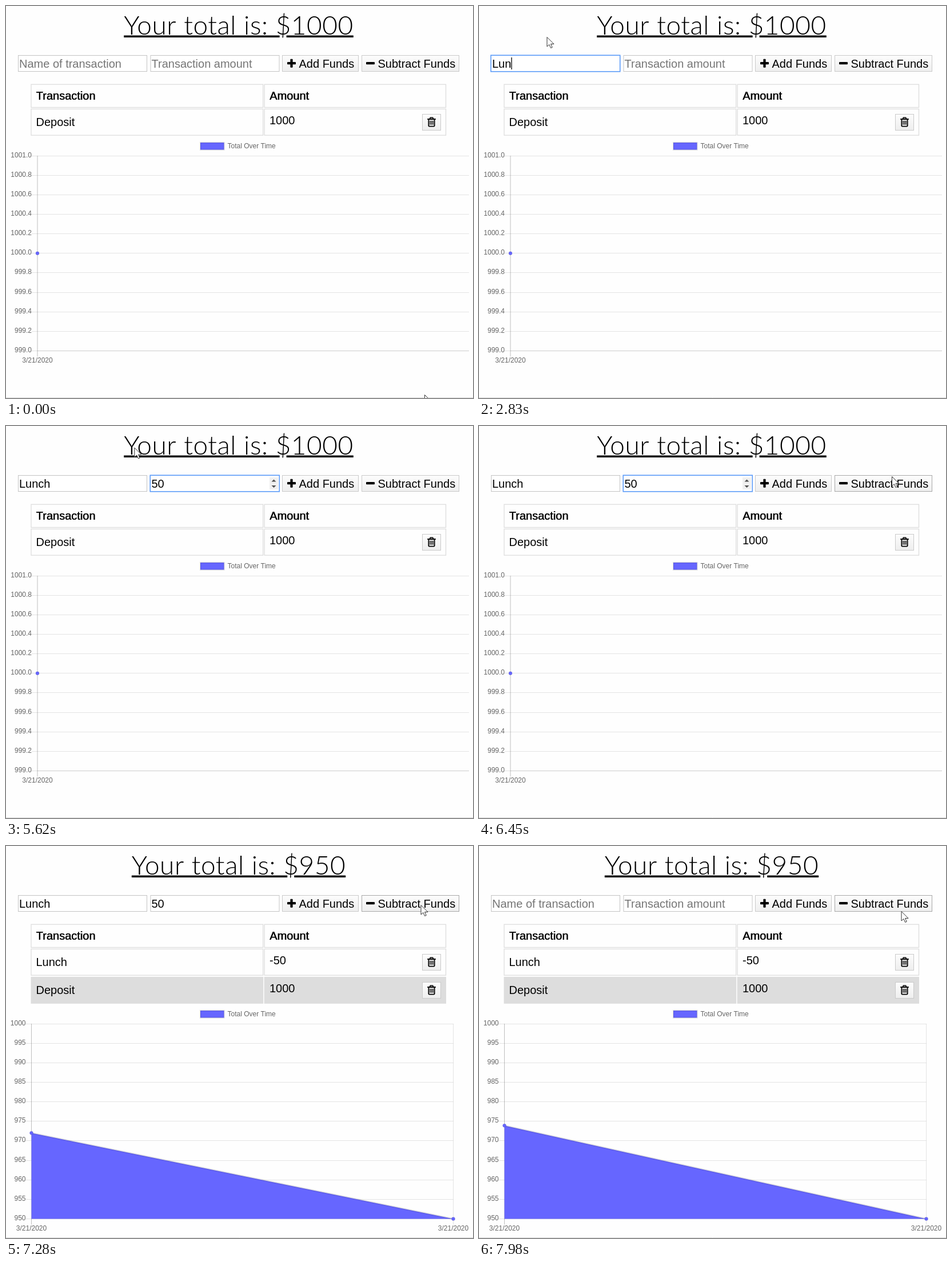
These frames come from a looping animation (817x686 px, 8000 ms). An HTML page with a canvas:

```html
<!DOCTYPE html>
<html lang="en">
<head>
<meta charset="utf-8">
<title>Budget tracker</title>
<style>
  html, body { margin: 0; width: 100%; height: 100%; overflow: hidden; background: #fefefe; }
  canvas { display: block; }
</style>
</head>
<body>
<canvas id="stage" width="817" height="686"></canvas>
<script>
const ctx = document.getElementById('stage').getContext('2d');
const LOOP = 8000;
const SANS = '"Liberation Sans", Arial, sans-serif';
const BLUE = '#6666ff';
const PAPER = '#fefefe';

// Pointer bursts: start, end, number of steps, then the points passed through.
const moves = [
  [60, 120, 2, [732, 680], [726, 420], [712, 171]],
  [370, 510, 3, [712, 171], [716, 160], [420, 120], [186, 99]],
  [690, 810, 3, [186, 99], [180, 101], [176, 106], [176, 109]],
  [1010, 1090, 2, [176, 109], [180, 111], [184, 112]],
  [1290, 1770, 8, [184, 112], [176, 104], [152, 80], [132, 62], [121, 55], [118.5, 54]],
  [5120, 5250, 3, [118.5, 54], [124, 54], [156, 56]],
  [5520, 6310, 13, [156, 56], [230, 36], [350, 21], [480, 25], [610, 45], [700, 68], [744, 81]],
  [6380, 6570, 4, [744, 81], [732, 85], [722, 88], [722, 97], [725.5, 103]],
  [7830, 7980, 3, [725.5, 103], [728, 105], [733, 109], [738.5, 114]]
];

// Typed text: time, then the value shown.
const nameKeys = [[2380, 'L'], [2630, 'Lu'], [2830, 'Lun'], [3060, 'Lunc'], [3130, 'Lunch'], [7650, '']];
const amountKeys = [[4500, '5'], [4620, '50'], [7650, '']];

const latest = (list, t, start) => list.reduce((v, [at, value]) => t >= at ? value : v, start);

function along(points, p) {
  const s = p * (points.length - 1);
  const i = Math.min(Math.floor(s), points.length - 2);
  return [0, 1].map(k => points[i][k] + (points[i + 1][k] - points[i][k]) * (s - i));
}

function pointerAt(t) {
  let pos = [732, 680];
  for (const [start, end, steps, ...points] of moves) {
    if (t < start) break;
    const gap = (end - start) / (steps - 1);
    const done = Math.min(steps, Math.floor((t - start) / gap + 1e-6) + 1);
    pos = along(points, done / steps);
  }
  return pos;
}

function text(str, x, y, size = 20, color = '#000', align = 'left', baseline = 'alphabetic') {
  ctx.font = `${size}px ${SANS}`;
  ctx.fillStyle = color;
  ctx.textAlign = align;
  ctx.textBaseline = baseline;
  ctx.fillText(str, x, y);
}

function line(x1, y1, x2, y2, color) {
  ctx.strokeStyle = color;
  ctx.lineWidth = 1;
  ctx.beginPath();
  ctx.moveTo(x1, y1);
  ctx.lineTo(x2, y2);
  ctx.stroke();
}

function frame(x, y, w, h, color, width = 1) {
  ctx.strokeStyle = color;
  ctx.lineWidth = width;
  ctx.strokeRect(x, y, w, h);
}

function title(total) {
  const lead = 'Your total is: ';
  const str = lead + '$' + total;
  ctx.font = '300 46px Lato, sans-serif';
  ctx.letterSpacing = '0.55px';
  ctx.textAlign = 'left';
  ctx.textBaseline = 'alphabetic';
  ctx.fillStyle = '#000';
  const w = ctx.measureText(str).width;
  const x = 407 - w / 2;
  const dollar = x + ctx.measureText(lead).width + 13;
  ctx.fillRect(x, 51.5, dollar - 6 - x, 3.5);
  ctx.fillRect(dollar + 6, 51.5, x + w - dollar - 6, 3.5);
  ctx.fillText(str, x, 50);
  ctx.letterSpacing = '0px';
}

function input(x, value, hint, focus, caret) {
  ctx.fillStyle = '#fff';
  ctx.fillRect(x, 86, 226, 29);
  if (focus) frame(x - 0.25, 86.25, 226, 28.5, '#5b9bf8', 1.6);
  else frame(x + 0.5, 86.5, 225, 28, '#c4c4c4');
  text(value || hint, x + 2, 107.5, 20, value ? '#000' : '#757575');
  if (caret) {
    ctx.fillStyle = '#000';
    ctx.fillRect(x + 2 + (value ? ctx.measureText(value).width : 0), 90, 1.3, 21);
  }
}

function triangle(x, y, dy) {
  ctx.beginPath();
  ctx.moveTo(x - 4, y);
  ctx.lineTo(x + 4, y);
  ctx.lineTo(x, y + dy);
  ctx.fill();
}

function spinner() {
  ctx.fillStyle = '#f0f0f0';
  ctx.fillRect(461, 90, 15, 21);
  ctx.fillStyle = '#505050';
  triangle(468.5, 97.5, -4);
  triangle(468.5, 104, 4);
}

function button(x, y, w, h, border = '#cacaca', pressed = false) {
  const g = ctx.createLinearGradient(0, y, 0, y + h);
  g.addColorStop(0, pressed ? '#e8e8e8' : '#fdfdfd');
  g.addColorStop(1, pressed ? '#e4e4e4' : '#eeeeee');
  ctx.fillStyle = g;
  ctx.fillRect(x, y, w, h);
  frame(x + 0.5, y + 0.5, w - 1, h - 1, border);
}

function bar(x, y, w, h) {
  ctx.fillStyle = '#000';
  ctx.beginPath();
  ctx.roundRect(x, y, w, h, 1);
  ctx.fill();
}

function trash(y) {
  button(728, y, 33, 29);
  const cy = y + 14;
  bar(737, cy - 6, 15, 2);
  ctx.strokeStyle = '#000';
  ctx.lineWidth = 1.6;
  ctx.beginPath();
  ctx.moveTo(741.5, cy - 6);
  ctx.lineTo(742.3, cy - 7.6);
  ctx.lineTo(746.7, cy - 7.6);
  ctx.lineTo(747.5, cy - 6);
  ctx.stroke();
  ctx.lineWidth = 1.9;
  ctx.beginPath();
  ctx.roundRect(739.4, cy - 5, 10.2, 12.6, 1.2);
  ctx.stroke();
  for (const x of [741.6, 744, 746.4]) bar(x - 0.1, cy - 2.5, 1.3, 7.5);
}

function cells(y, h, split, fill) {
  for (const [x, w] of [[44, split - 44], [split + 2.5, 767 - split]]) {
    if (fill) {
      ctx.fillStyle = fill;
      ctx.fillRect(x - 0.5, y - 0.5, w + 1, h + 1);
    } else frame(x, y, w, h, '#dddddd', 1.3);
  }
}

function heading(str, x) {
  text(str, x, 164);
  text(str, x + 0.6, 164);
}

function table(rows) {
  const split = rows.length ? 449.7 : 465;
  cells(137.2, 40.3, split);
  heading('Transaction', 52.5);
  heading('Amount', split + 11.3);
  rows.forEach(([label, amount], i) => {
    const y = 180.2 + i * 49.2;
    cells(y, 46, split, i % 2 ? '#dddddd' : '');
    text(label, 52.5, y + 29.8);
    text(amount, split + 11.3, y + 26.8);
    trash(Math.round(y + 8.5));
  });
}

function dot(x, y) {
  ctx.fillStyle = BLUE;
  ctx.strokeStyle = 'rgba(0,0,0,0.1)';
  ctx.lineWidth = 1;
  ctx.beginPath();
  ctx.arc(x, y, 3, 0, Math.PI * 2);
  ctx.fill();
  ctx.stroke();
}

function chart({ top, left, right, max, step, digits, marks, values }) {
  const GRID = 'rgba(0,0,0,0.1)', AXIS = 'rgba(0,0,0,0.25)', INK = '#666';
  const bottom = top + 341.5;
  ctx.fillStyle = BLUE;
  ctx.fillRect(340, top - 23, 41.5, 12.5);
  frame(340, top - 23, 41.5, 12.5, GRID, 2.5);
  text('Total Over Time', 387.5, top - 16.5, 12, INK, 'left', 'middle');
  for (let i = 0; i <= 10; i++) {
    const y = Math.round(top + i * 34.15 - 0.5) + 0.5;
    line(left - 10, y, right, y, GRID);
    text((max - i * step).toFixed(digits), left - 10, y - 0.5, 12, INK, 'right', 'middle');
  }
  line(left, Math.floor(bottom) + 0.5, right, Math.floor(bottom) + 0.5, GRID);
  marks.forEach((x, i) => {
    line(x, top, x, bottom + 10, i ? GRID : AXIS);
    text('3/21/2020', x, bottom + 17, 12, INK, 'center', 'middle');
  });
  const pts = values.map((v, i) => [marks[i], bottom - v * 341.5]);
  if (pts.length > 1) {
    const [[x1, y1], [x2, y2]] = pts;
    ctx.fillStyle = BLUE;
    ctx.beginPath();
    ctx.moveTo(x1, y1);
    ctx.lineTo(x2, y2);
    ctx.lineTo(x1, bottom);
    ctx.fill();
    ctx.strokeStyle = GRID;
    ctx.lineWidth = 3;
    ctx.stroke(new Path2D(`M${x1} ${y1}L${x2} ${y2}`));
  }
  pts.forEach(p => dot(...p));
}

const easeOutQuart = p => 1 - (1 - p) ** 4;

function spentChart(t) {
  // Elapsed chart time in ms; the first run is cut short by the reload.
  const elapsed = latest([[7170, 17], [7230, 80], [7280, 135], [7830, 0], [7905, 76], [7980, 150]], t, 0);
  chart({ top: 311, left: 44.5, right: 782.5, max: 1000, step: 5, digits: 0,
    marks: [44.5, 782.5], values: [easeOutQuart(elapsed / 1000), 0] });
}

function arrow(x, y) {
  ctx.beginPath();
  [[0, 0], [0, 16.5], [3.9, 13], [6.6, 19], [9.2, 17.9], [6.6, 12], [12, 12]]
    .forEach(([dx, dy]) => ctx.lineTo(x + dx + 0.5, y + dy + 0.5));
  ctx.closePath();
  ctx.fillStyle = '#fff';
  ctx.fill();
  ctx.strokeStyle = '#333';
  ctx.lineWidth = 1;
  ctx.stroke();
}

function beam(x, y) {
  x = Math.round(x) + 0.5;
  line(x, y - 8, x, y + 8, '#000');
  for (const end of [-8.5, 8.5]) line(x - 3.5, y + end, x + 3.5, y + end, '#000');
}

function pointer(t) {
  const [x, y] = pointerAt(t);
  const overInput = x > 21 && x < 247 && y > 86 && y < 115;
  (overInput ? beam : arrow)(x, y);
}

function draw(t) {
  ctx.fillStyle = PAPER;
  ctx.fillRect(0, 0, 817, 686);

  const empty = t >= 7650 && t < 7830;
  const spent = t >= 7110;
  title(empty ? 0 : spent ? 950 : 1000);

  const focus = t < 1090 || t >= 6770 ? '' : t < 3490 ? 'name' : 'amount';
  const lastKey = latest([1090, 2380, 2630, 2830, 3060, 3130, 3490, 4500, 4620].map(k => [k, k]), t, 0);
  const caretOn = Math.floor((t - lastKey) / 530) % 2 === 0;
  const amount = latest(amountKeys, t, '');
  input(21, latest(nameKeys, t, ''), 'Name of transaction', focus === 'name', focus === 'name' && caretOn);
  input(252.5, amount, 'Transaction amount', focus === 'amount', focus === 'amount' && caretOn);
  if (focus === 'amount') spinner();

  button(483, 86, 134, 29);
  bar(492, 98, 15, 4.2);
  bar(497.4, 92.7, 4.2, 15);
  text('Add Funds', 512.5, 107.5);
  button(622, 86, 171, 29, t >= 6380 ? '#a8a8a8' : '#cacaca', t >= 6770 && t < 6890);
  bar(630, 98, 15, 4.2);
  text('Subtract Funds', 650.5, 107.5);

  const rows = empty ? [] : [['Deposit', '1000']];
  if (spent && !empty) rows.unshift(['Lunch', '-50']);
  table(rows);

  if (!spent) {
    chart({ top: 262, left: 55, right: 810, max: 1001, step: 0.2, digits: 1, marks: [55], values: [0.5] });
  } else if (!empty) spentChart(t);

  line(0, 685.5, 817, 685.5, '#dcdcdc');
  pointer(t);
}

const began = performance.now();
function tick() {
  draw((performance.now() - began) % LOOP);
  requestAnimationFrame(tick);
}
tick();
</script>
</body>
</html>
```
